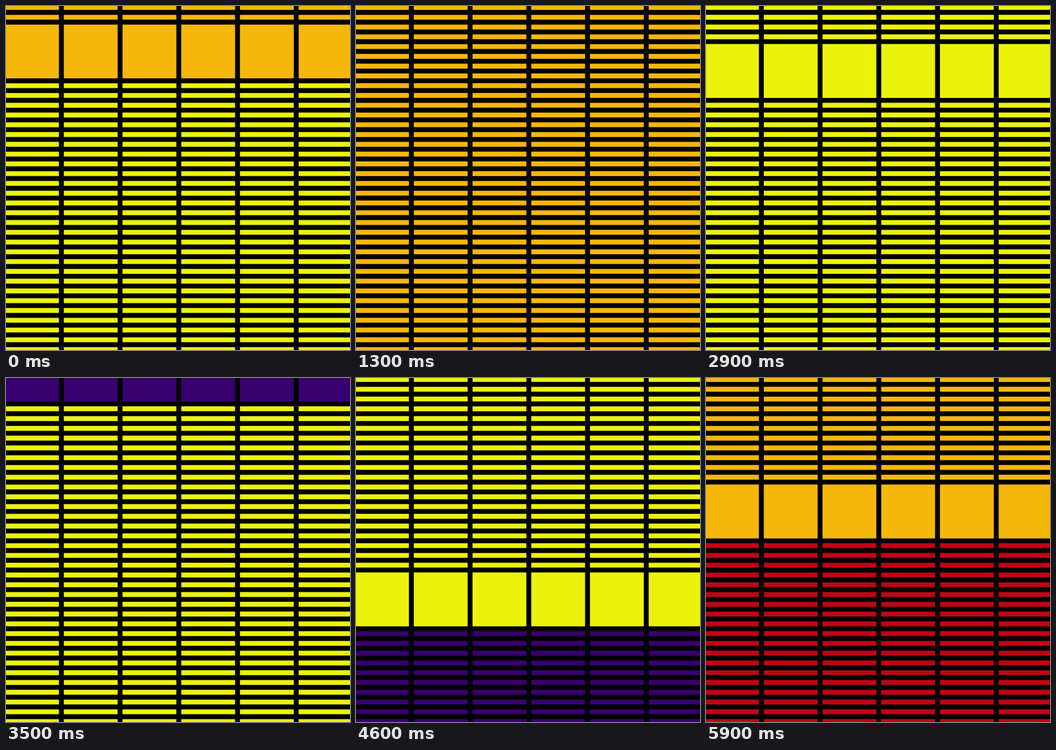
Write an HTML page without scripts that moves like this. It is 748 by 749 pixels and loops after 6000 ms.

```html
<!DOCTYPE html>
<html lang="en">
<head>
<meta charset="utf-8">
<title>Colour sweeps</title>
<style>
  html, body { margin: 0; width: 100%; height: 100%; overflow: hidden; background: #000; }
  svg { display: block; width: 748px; height: 749px; }
  .yellow { color: #ecf30a; }
  .orange { color: #f5b80a; }
  .purple { color: #39006f; }
  .red { color: #c00414; }
  /* six rows (twelve units) every 100 ms */
  .strip { animation: fall 6s steps(60) infinite; }
  @keyframes fall {
    from { transform: translateY(0); }
    to { transform: translateY(720px); }
  }
</style>
</head>
<body>
<svg viewBox="0 0 748 749">
  <defs>
    <!-- thin rows with a solid block at the lower end -->
    <g id="sweep">
      <path d="M36 0V-86" stroke="currentColor" stroke-width="72" stroke-dasharray="1" stroke-dashoffset="1"/>
      <path d="M0-12H72V-1H0z" fill="currentColor"/>
    </g>
  </defs>
  <rect width="748" height="749"/>
  <!-- one unit is the thickness of a row -->
  <g transform="translate(0 -2.1) scale(10.64)">
    <g class="strip">
      <use href="#sweep" class="yellow" y="102"/>
      <use href="#sweep" class="orange" y="16"/>
      <use href="#sweep" class="orange" y="-70"/>
      <use href="#sweep" class="purple" y="-156"/>
      <use href="#sweep" class="yellow" y="-242"/>
      <use href="#sweep" class="yellow" y="-328"/>
      <use href="#sweep" class="purple" y="-414"/>
      <use href="#sweep" class="yellow" y="-500"/>
      <path class="red" d="M0-674H72v1H0z" fill="currentColor"/>
      <use href="#sweep" class="red" y="-586"/>
      <use href="#sweep" class="orange" y="-674"/>
    </g>
    <path d="M10.81 36H72" stroke="#000" stroke-width="74" stroke-dasharray="1 11"/>
  </g>
</svg>
</body>
</html>
```
